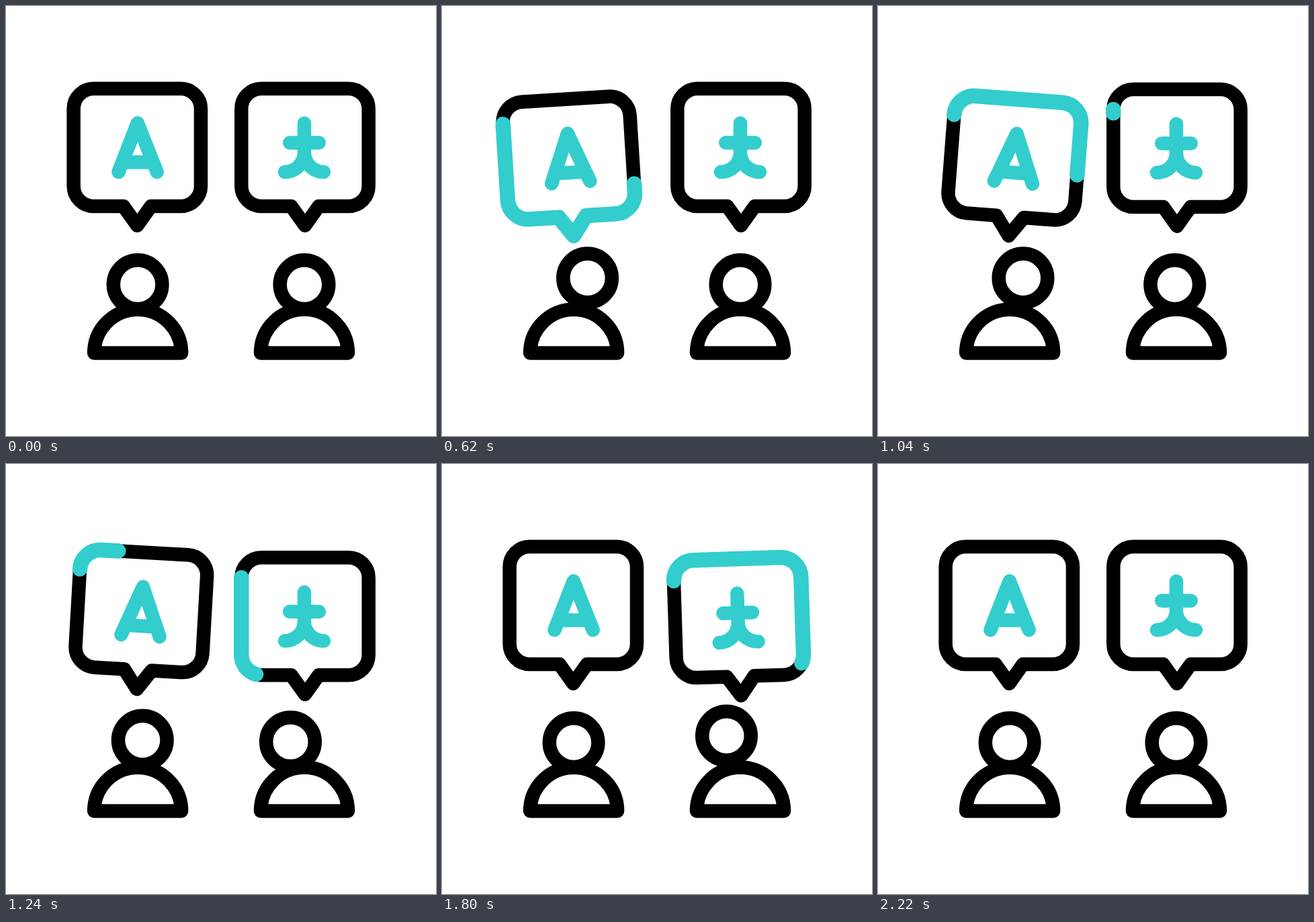
Animation, 640 px wide and 640 px high, one loop 2.4 s. Source, as an HTML page:

```html
<!DOCTYPE html>
<html lang="en">
<head>
<meta charset="utf-8">
<title>Translation dialogue</title>
<style>
  html, body { margin: 0; width: 100%; height: 100%; overflow: hidden; background: #fff; }
  svg { display: block; width: 100%; height: 100%; }
  path, circle { fill: none; stroke: #000; stroke-width: 20.5; stroke-linecap: round; stroke-linejoin: round; }
  .glyph, .trace { stroke: #33cdcd; }
  .trace { stroke-width: 22.5; }
</style>
</head>
<body>
<svg id="stage" viewBox="0 0 640 640"></svg>
<script>
const LOOP = 2400;
const stage = document.getElementById('stage');

// Outline runs counterclockwise from the top of the left edge.
const bubble = 'M-94.7 153v115a30 30 0 0 0 30 30h44.2l20.5 28.7 20.5-28.7h44.2' +
  'a30 30 0 0 0 30-30V153a30 30 0 0 0-30-30H-64.7a30 30 0 0 0-30 30';

const speakers = [
  { x: 195.3, bodyX: 196.1, dir: 1, start: 200, lift: 15.3, swing: 10, pivot: 316,
    glyph: 'M-27.8 247 .4 174.3 29.4 247M-19 232.5h40' },
  { x: 445, bodyX: 444, dir: -1, start: 1000, lift: 18, swing: 10.4, pivot: 322,
    glyph: 'M-1 174.5V218a29 29 0 0 1-29 29M-1 218a29 29 0 0 0 29 29M-22.8 203.5h43.6' }
];

function add(parent, tag, attrs) {
  const el = document.createElementNS('http://www.w3.org/2000/svg', tag);
  for (const key in attrs) el.setAttribute(key, attrs[key]);
  return parent.appendChild(el);
}

// Eased value at time t through [time, value] keys.
function track(t, ...keys) {
  if (t <= keys[0][0]) return keys[0][1];
  for (let i = 1; i < keys.length; i++) {
    const [t0, a] = keys[i - 1], [t1, b] = keys[i];
    if (t < t1) {
      const p = (t - t0) / (t1 - t0);
      return a + (b - a) * p * p * (3 - 2 * p);
    }
  }
  return keys[keys.length - 1][1];
}

for (const s of speakers) {
  add(stage, 'path', { d: `M${s.bodyX - 65} 516.6a65 65 0 0 1 130 0z` });
  s.head = add(stage, 'circle', { cx: s.bodyX, cy: 414.6, r: 36.3 });
  s.group = add(stage, 'g', {});
  add(s.group, 'path', { d: bubble + 'z' });
  s.trace = add(s.group, 'path', { d: bubble, class: 'trace', pathLength: 1 });
  add(s.group, 'path', { d: s.glyph, class: 'glyph' });
}

function pose(s, t) {
  const u = t - s.start;
  const shift = track(u, [0, 0], [200, 20.5], [800, 20.5], [1200, 0]);
  const nod = track(u, [200, 0], [400, -10], [600, 0], [800, -10], [1200, 0]);
  s.head.setAttribute('transform', `translate(${s.dir * shift} ${nod})`);

  const drop = track(u, [0, 0], [300, s.lift], [900, s.lift], [1200, 0]);
  const tilt = -s.dir * track(u, [300, 0], [600, s.swing], [900, -6], [1200, 0]);
  s.group.setAttribute('transform', `translate(${s.x} ${drop}) rotate(${tilt} 0 ${s.pivot})`);

  const tail = track(u, [400, 0], [1200, 1]);
  const tip = track(u, [0, 0], [800, 1]);
  s.trace.style.display = tip > tail ? '' : 'none';
  s.trace.setAttribute('stroke-dasharray', `${tip - tail} 2`);
  s.trace.setAttribute('stroke-dashoffset', -tail);
}

function draw() {
  const t = performance.now() % LOOP;
  for (const s of speakers) pose(s, t);
  requestAnimationFrame(draw);
}
draw();
</script>
</body>
</html>
```
